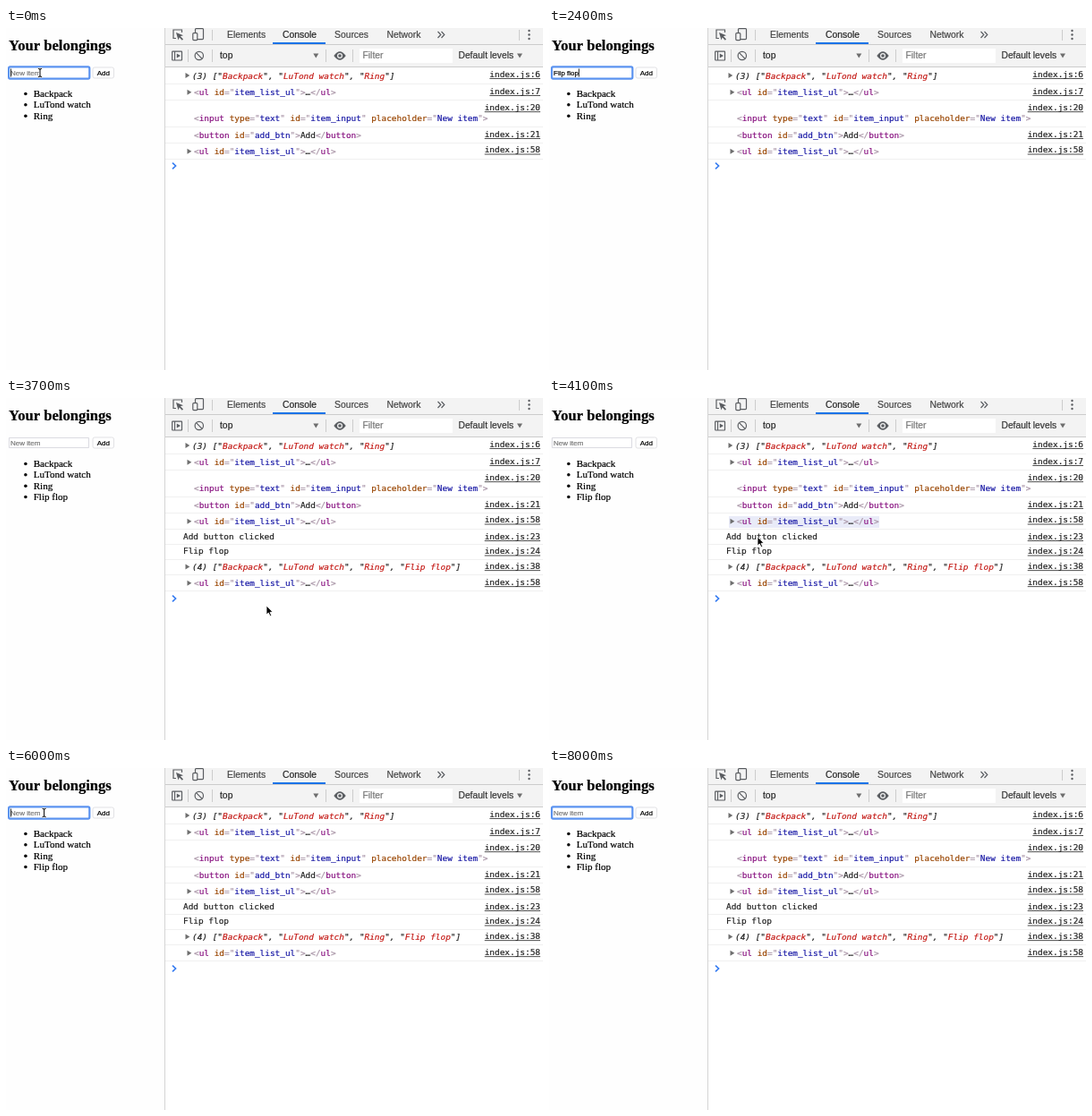
Write an HTML page with a canvas that moves like this. It is 600x382 px and loops after 8100 ms.

```html
<!DOCTYPE html>
<html lang="en">
<head>
<meta charset="utf-8">
<title>Belongings list</title>
<style>
html, body { margin: 0; width: 100%; height: 100%; overflow: hidden; background: #fefefe; }
canvas { display: block; width: 600px; height: 382px; }
</style>
</head>
<body>
<canvas id="stage"></canvas>
<script>
const LOOP = 8100, STEP = 100, BLINK = 533;
const CLICK_ADD = 3200, LOGGED = 3400, REFOCUS = 5900;
const WORD = 'Flip flop';
const KEYS = [600, 700, 800, 900, 1000, 1300, 1500, 1700, 1900];
const ITEMS = ['Backpack', 'LuTond watch', 'Ring'];

const SERIF = '"Liberation Serif", Times, serif';
const SANS = '"Liberation Sans", Arial, sans-serif';
const MONO = '9.42px "DejaVu Sans Mono", Menlo, monospace';
const INK = '#222', ICON = '#5a5d61', RULE = '#cccccc', BLUE = '#1a73e8';
const COLORS = { tag: '#881280', attr: '#994500', val: '#1a1aa6', text: INK, mark: '#a894a6' };

// time, x, y of the pointer tip
const PATH = [
  [2500, 42, 50], [2900, 107, 47], [3300, 107, 47], [3500, 187, 150],
  [3700, 291, 232], [3900, 349, 155], [4100, 233, 155], [4300, 233, 155],
  [4700, 112, 184], [4900, 75, 152], [5100, 47, 136], [5500, 42.6, 50]
];

const canvas = document.getElementById('stage');
const ratio = window.devicePixelRatio || 1;
canvas.width = 600 * ratio;
canvas.height = 382 * ratio;
const c = canvas.getContext('2d');
c.scale(ratio, ratio);

function box(x, y, w, h, fill) {
  c.fillStyle = fill;
  c.fillRect(x, y, w, h);
}

// a hairline stroke gives the text a slightly heavier weight
function label(str, x, y, font, color, align = 'left') {
  c.font = font;
  c.fillStyle = c.strokeStyle = color;
  c.textAlign = align;
  c.lineWidth = 0.2;
  c.fillText(str, x, y);
  c.strokeText(str, x, y);
  return x + c.measureText(str).width;
}

function poly(points, fill, stroke, width = 1) {
  c.beginPath();
  points.forEach(([x, y], i) => i ? c.lineTo(x, y) : c.moveTo(x, y));
  if (fill) {
    c.closePath();
    c.fillStyle = fill;
    c.fill();
  }
  if (stroke) {
    c.strokeStyle = stroke;
    c.lineWidth = width;
    c.stroke();
  }
}

function rounded(x, y, w, h, r, fill, stroke, width = 1) {
  c.beginPath();
  c.roundRect(x, y, w, h, r);
  if (fill) {
    c.fillStyle = fill;
    c.fill();
  }
  c.strokeStyle = stroke;
  c.lineWidth = width;
  c.stroke();
}

function circle(x, y, r, fill, stroke) {
  c.beginPath();
  c.arc(x, y, r, 0, Math.PI * 2);
  if (fill) {
    c.fillStyle = fill;
    c.fill();
  }
  if (stroke) {
    c.strokeStyle = stroke;
    c.lineWidth = 1.2;
    c.stroke();
  }
}

const right = (x, y, s, color) => poly([[x, y - s], [x + s * 1.6, y], [x, y + s]], color);
const down = (x, y) => poly([[x - 3, y - 2.5], [x + 3, y - 2.5], [x, y + 2.5]], '#6e6e6e');

function markup(src, y, open) {
  let x = 210, state = 'text';
  if (open) right(202.5, y - 3.2, 3, '#6e6e6e');
  for (const tok of src.split(/(<\/?|>|="|"|\s)/)) {
    if (!tok) continue;
    const mark = /^(<\/?|>|="|")$/.test(tok);
    x = label(tok, x, y, MONO, COLORS[mark ? 'mark' : state]);
    if (tok[0] === '<') state = 'tag';
    else if (tok === '>') state = 'text';
    else if (tok === '="') state = 'val';
    else if (tok === '"' || (tok === ' ' && state === 'tag')) state = 'attr';
  }
}

function preview(list, y) {
  const font = 'italic ' + MONO;
  right(200.5, y - 3.4, 3, '#6e6e6e');
  let x = label(`(${list.length}) [`, 208, y, font, INK);
  list.forEach((item, i) => {
    x = label(i ? ', "' : '"', x, y, font, INK);
    x = label(item, x, y, font, '#c41a16');
    x = label('"', x, y, font, INK);
  });
  label(']', x, y, font, INK);
}

function source(line, y) {
  const str = 'index.js:' + line;
  label(str, 597, y, MONO, INK, 'right');
  const w = c.measureText(str).width;
  box(597 - w, y + 1.3, w, 0.8, INK);
}

function rule(y) {
  box(178, y, 422, 1, '#f0f0f0');
}

function prompt(y) {
  poly([[186, y - 3.4], [189.6, y], [186, y + 3.4]], null, '#367cf1', 1.6);
}

function toolbar() {
  const tab = '10.35px ' + SANS;
  box(178, 0, 422, 44, '#f3f3f3');
  box(178, 18, 422, 1, RULE);
  box(178, 43, 422, 1, RULE);

  // element picker and device icons
  poly([[190, 11.5], [187, 11.5], [187, 2], [196.5, 2], [196.5, 5]], null, ICON, 1.2);
  poly([[190, 5], [198, 8.2], [194.9, 9.3], [198, 12.5], [196.8, 13.7], [193.7, 10.6], [192.5, 13.5]], ICON);
  rounded(211.5, 0.6, 9, 12, 1, null, ICON, 1.2);
  rounded(208.8, 5.6, 5, 8, 1, '#f3f3f3', ICON, 1.2);
  box(230, 2, 1, 12, RULE);

  label('Elements', 247, 10.9, tab, '#444');
  label('Console', 309, 10.9, tab, INK);
  label('Sources', 367, 10.9, tab, '#444');
  label('Network', 425.5, 10.9, tab, '#444');
  box(298, 16, 59, 2, BLUE);
  for (const x of [482.5, 486.5]) {
    poly([[x, 4], [x + 3.3, 7.5], [x, 11]], null, ICON, 1.2);
  }
  box(573, 2, 1, 12, RULE);
  for (const y of [3, 7.5, 12]) circle(584.5, y, 1.2, ICON);

  // sidebar toggle, clear, eye
  rounded(185.7, 26.2, 10.8, 9.8, 0.5, null, ICON, 1.2);
  box(188, 26, 1.1, 10, ICON);
  right(190.8, 31, 2.6, ICON);
  box(203, 24, 1, 14, RULE);
  circle(215.8, 31, 4.7, null, ICON);
  poly([[212.5, 27.7], [219.1, 34.3]], null, ICON, 1.2);
  box(230, 24, 1, 14, RULE);
  label('top', 239, 34.2, tab, INK);
  down(346.3, 31);
  box(357, 24, 1, 14, RULE);
  c.beginPath();
  c.moveTo(366.3, 31);
  c.quadraticCurveTo(373, 21.5, 379.7, 31);
  c.quadraticCurveTo(373, 40.5, 366.3, 31);
  c.fillStyle = ICON;
  c.fill();
  circle(373, 31, 3, '#f3f3f3');
  circle(373, 31, 1.8, ICON);
  box(387, 24, 1, 14, RULE);

  box(395, 23, 104, 16, '#fff');
  label('Filter', 398.5, 34.3, tab, '#757575');
  label('Default levels', 505.5, 34.3, '10.25px ' + SANS, '#333');
  down(574, 31);
}

function consolePanel(t) {
  const list = '<ul id="item_list_ul">…</ul>';
  box(178, 44, 422, 338, '#fff');
  [62, 80, 110, 128, 146].forEach(rule);
  preview(ITEMS, 56.5);
  source(6, 54.8);
  markup(list, 75, true);
  source(7, 73.8);
  source(20, 92);
  markup('<input type="text" id="item_input" placeholder="New item">', 104);
  markup('<button id="add_btn">Add</button>', 122.8);
  source(21, 121.8);
  if (t >= 4000 && t < 4200) box(201, 132, 168, 13, '#e9ebf8');
  markup(list, 141, true);
  source(58, 139.3);

  if (t < LOGGED) {
    prompt(154);
    return;
  }
  [163, 180, 197, 215].forEach(rule);
  label('Add button clicked', 198, 157.7, MONO, INK);
  source(23, 157.7);
  label(WORD, 198, 174.3, MONO, INK);
  source(24, 174.3);
  preview([...ITEMS, WORD], 191.8);
  source(38, 191);
  markup(list, 210, true);
  source(58, 209);
  prompt(224);
}

function page(t) {
  const font = '8px ' + SANS;
  const added = t >= CLICK_ADD;
  const focused = t < CLICK_ADD - 100 || t >= REFOCUS;
  const typed = added ? '' : WORD.slice(0, KEYS.filter(k => k <= t).length);

  box(0, 0, 177, 382, '#fefefe');
  box(177, 0, 1, 382, '#d4d4d4');
  label('Your belongings', 3, 25.4, 'bold 16.6px ' + SERIF, '#000');

  if (focused) rounded(3.1, 43.4, 90.2, 13.2, 1.5, '#fff', '#5b93f0', 2.2);
  else rounded(3.5, 44.5, 89, 11, 0, '#fff', '#d2d2da', 0.8);
  const end = typed ? label(typed, 5, 52.7, font, '#000') : 5.2;
  if (!typed) label('New item', 5, 52.7, font, '#757575');
  const since = t >= REFOCUS ? REFOCUS : Math.max(0, ...KEYS.filter(k => k <= t));
  if (focused && (t - since) % (2 * BLINK) < BLINK) box(end, 45.5, 0.8, 9, '#000');

  const pressed = t >= CLICK_ADD - 100 && t < CLICK_ADD + 200;
  rounded(97, 44, 23.5, 12, 2, pressed ? '#eef1fb' : '#fff', '#dadade', 0.8);
  label('Add', 101.7, 52.7, font, '#000');

  const items = added ? [...ITEMS, WORD] : ITEMS;
  items.forEach((item, i) => {
    const y = 76.8 + i * 12.4;
    circle(21.9, y - 3.4, 1.75, '#000');
    label(item, 30.7, y, '11.07px ' + SERIF, '#000');
  });
}

function beam(x, y) {
  c.lineCap = 'round';
  for (const [color, width] of [['#fff', 2.2], ['#000', 1]]) {
    for (const s of [-1, 1]) {
      poly([[x - 1.8, y + 4.8 * s], [x, y + 3.8 * s], [x + 1.8, y + 4.8 * s]], null, color, width);
    }
    poly([[x, y - 4], [x, y + 4]], null, color, width);
  }
  c.lineCap = 'butt';
}

function arrow(x, y) {
  const shape = [[0, 0], [0, 10], [2.3, 7.9], [4, 11.6], [5.6, 10.9], [4, 7.3], [7, 7.1], [0, 0]];
  poly(shape.map(([a, b]) => [x + a, y + b]), '#000', '#fff', 0.8);
}

function pointer(t) {
  if (t < 500) return beam(38, 50);
  if (t < PATH[0][0] || t >= 7000) return;
  let [, x, y] = PATH[PATH.length - 1];
  const i = PATH.findIndex(p => p[0] > t);
  if (i > 0) {
    const [t0, x0, y0] = PATH[i - 1], [t1, x1, y1] = PATH[i];
    const k = (t - t0) / (t1 - t0);
    x = x0 + (x1 - x0) * k;
    y = y0 + (y1 - y0) * k;
  }
  const overInput = x > 3 && x < 94 && y > 43 && y < 57;
  (overInput ? beam : arrow)(x, y);
}

function draw(now) {
  const t = Math.floor(now % LOOP / STEP) * STEP;
  page(t);
  consolePanel(t);
  toolbar();
  pointer(t);
}

const start = performance.now();
function tick() {
  draw(performance.now() - start);
  requestAnimationFrame(tick);
}
tick();
</script>
</body>
</html>
```
